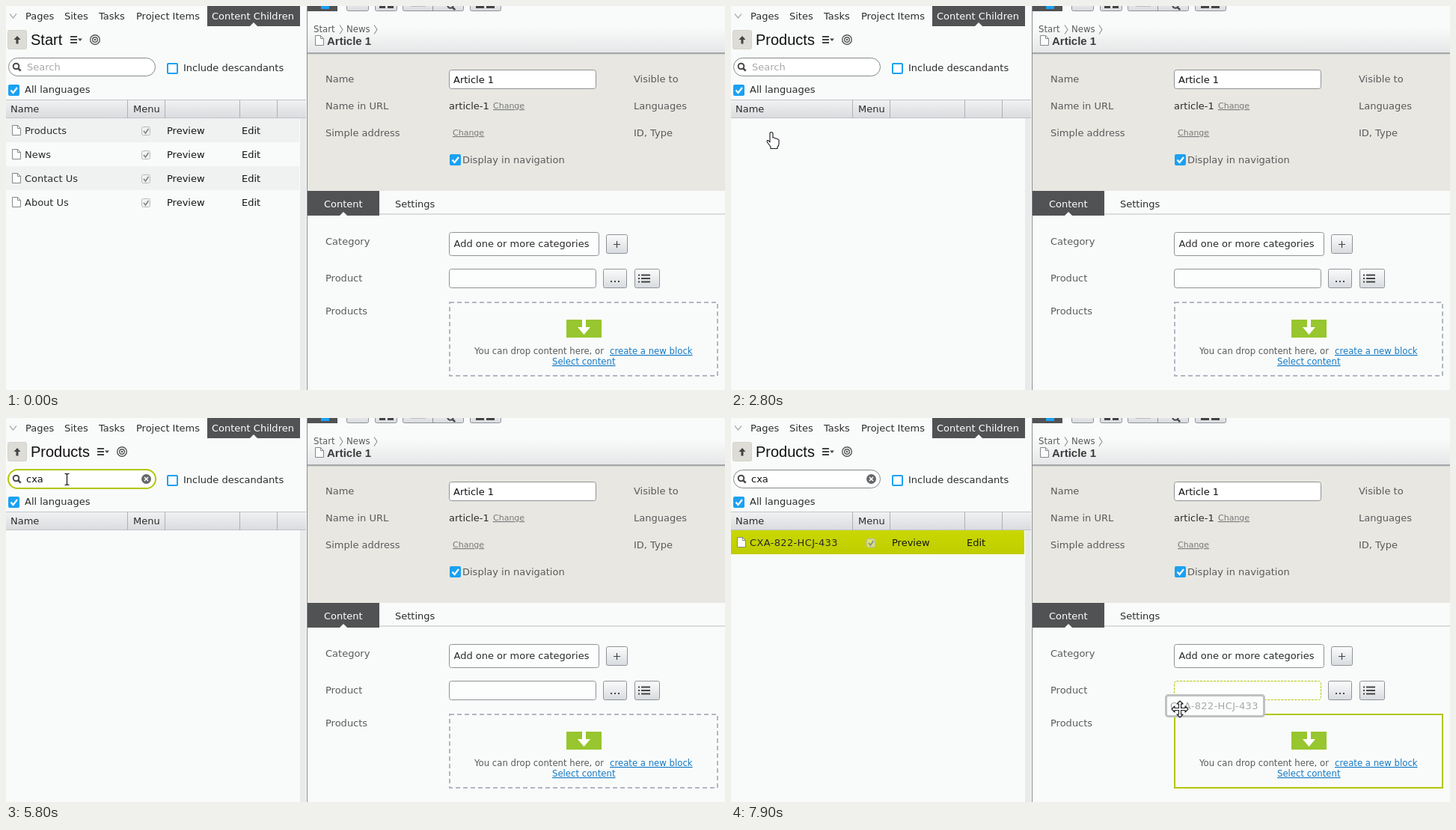
An HTML page that plays this animation: 961 px wide and 513 px high, repeating every 8000 ms.

```html
<!DOCTYPE html>
<html lang="en">
<head>
<meta charset="utf-8">
<title>Content Children</title>
<style>
html, body { margin: 0; width: 100%; height: 100%; overflow: hidden; background: #f9fbfa; }
svg { display: block; width: 100%; height: 100%; }
text { font-family: "DejaVu Sans", Verdana, sans-serif; white-space: pre; }
.arial { font-family: "Liberation Sans", Arial, sans-serif; }
.code { letter-spacing: .027em; }
.link { text-decoration: underline; }
</style>
</head>
<body>
<svg id="stage" viewBox="0 0 961 513">
  <defs>
    <linearGradient id="head" x2="0" y2="1"><stop stop-color="#f1f2f3"/><stop offset="1" stop-color="#d9dbde"/></linearGradient>
    <linearGradient id="btn" x2="0" y2="1"><stop stop-color="#fbfcfc"/><stop offset="1" stop-color="#d8dbdf"/></linearGradient>
    <linearGradient id="crumb" x2="0" y2="1"><stop offset=".2" stop-color="#f9fbfa"/><stop offset="1" stop-color="#e6e7e8"/></linearGradient>
    <linearGradient id="pick" x2="0" y2="1"><stop stop-color="#c9d800"/><stop offset="1" stop-color="#bfcd00"/></linearGradient>
  </defs>
</svg>
<script>
const svg = document.getElementById('stage');
const INK = '#2b2b2b', LABEL = '#5a5a5c', DARK = '#515254', BLUE = '#1ba1f2', LIME = '#b3c600', PAGE = '#f9fbfa', EDGE = '#8f9297';

function el(tag, attrs = {}, parent = svg) {
  const n = document.createElementNS('http://www.w3.org/2000/svg', tag);
  for (const k in attrs) n.setAttribute(k, attrs[k]);
  parent.appendChild(n);
  return n;
}
const group = (parent = svg) => el('g', {}, parent);
const show = (n, on) => { n.style.display = on ? '' : 'none'; };
const box = (x, y, w, h, fill, parent, more = {}) =>
  el('rect', { x, y, width: w, height: h, fill, ...more }, parent);
const frame = (x, y, w, h, fill, stroke, rx, parent, more = {}) =>
  box(x + .5, y + .5, w - 1, h - 1, fill, parent, { stroke, rx, ...more });
const line = (d, stroke, width, parent, more = {}) =>
  el('path', { d, fill: 'none', stroke, 'stroke-width': width, ...more }, parent);
const shape = (d, fill, parent, more = {}) => el('path', { d, fill, ...more }, parent);
function text(x, y, str, fill = INK, size = 13, parent = svg, more = {}) {
  const n = el('text', { x, y, fill, 'font-size': size, ...more }, parent);
  n.textContent = str;
  return n;
}

// Icons
function page(x, y, g) {
  shape(`M${x + .5} ${y + .5}h7l4 4v9h-11z`, '#fdfdfd', g, { stroke: '#85878a' });
  line(`M${x + 7.5} ${y + .5}v4h4`, '#85878a', 1, g);
}
function checkbox(x, y, on) {
  box(x + 1, y + 1, 13, 13, on ? BLUE : '#fff', svg, { stroke: BLUE, 'stroke-width': 2, rx: 1 });
  if (on) line(`M${x + 3.5} ${y + 7.5}l3 3.5 5.5-7`, '#fff', 2.2);
}
function menu(x, y, g) {
  line(`M${x} ${y + 1}h9m-9 4h9m-9 4h9`, '#444', 1.8, g);
  shape(`M${x + 10} ${y + 3.5}h6l-3 3.5z`, '#444', g);
}
function lens(x, y, g) {
  el('circle', { cx: x, cy: y, r: 3.8, fill: 'none', stroke: '#4a4a4a', 'stroke-width': 2 }, g);
  line(`M${x + 2.8} ${y + 2.8}l3.4 3.4`, '#4a4a4a', 2.6, g);
}
const button = (x, y, w, h) => frame(x, y, w, h, 'url(#btn)', EDGE, 2);

box(0, 0, 961, 513, PAGE);

// Left pane: tabs
line('M5 10.5l4.5 5.5 4.5-5.5', '#a9abac', 1.2);
[[26, 'Pages'], [78, 'Sites'], [124, 'Tasks'], [174, 'Project Items']]
  .forEach(([x, s]) => text(x, 18, s));
box(269, 0, 124, 27, DARK);
text(275, 18, 'Content Children', '#fff');
shape('M326 27l5-5 5 5z', PAGE);

// Left pane: title and filters
frame(2, 32, 26, 26, '#dddcd6', '#d3d2cc', 2);
shape('M15 40l4.5 5h-3v5.500h-3v-5.500h-3z', '#444');
function heading(str, shift) {
  const g = group();
  text(33, 52, str, '#111', 20, g, { class: 'arial' });
  menu(86 + shift, 40, g);
  for (const r of [6.3, 3.3]) el('circle', { cx: 119 + shift, cy: 45, r, fill: 'none', stroke: '#555', 'stroke-width': 1.4 }, g);
  el('circle', { cx: 119 + shift, cy: 45, r: 1.3, fill: '#555' }, g);
  return g;
}
const titleA = heading('Start', 0), titleB = heading('Products', 36);

const plain = frame(3, 69, 197, 25, '#fff', '#85888b', 12);
const focus = box(3, 69, 197, 25, '#fff', svg, { stroke: LIME, 'stroke-width': 2, rx: 12.5 });
lens(13.5, 80.5);
const hint = text(28, 86, 'Search', '#a9a9a9');
const typed = text(27, 86, '', '#111');
const caret = box(0, 73, 1, 16, '#111');
const clear = group();
el('circle', { cx: 187.500, cy: 81.5, r: 6.5, fill: '#66686b' }, clear);
line('M185 79l5 5m0-5l-5 5', '#fff', 1.6, clear);
checkbox(215, 76, false);
text(237, 87, 'Include descandants');
checkbox(3, 105, true);
text(25, 116, 'All languages');

// Left pane: table
box(393, 150, 8, 363, '#e9ebeb');
const thumb = shape('M393 513v-358q0-5 4-5t4 5v358z', '#929394');
box(0, 125, 401, 25, 'url(#head)');
line('M0 125.5h401M0 149.5h401', '#c2c4c7', 1);
line('M162.5 126v24m50-24v24m100-24v24m50-24v24', '#aeb0b3', 1);
text(6, 142, 'Name');
text(170, 142, 'Menu');

const picks = [];
function list(names, cls) {
  const g = group();
  names.forEach((s, i) => {
    const y = 150 + 32 * i;
    if (i % 2 === 0) box(0, y, 392, 32, '#f0f2f1', g);
    if (i === 0) picks.push(box(0, y, 392, 32, 'url(#pick)', g));
    page(8, y + 9, g);
    text(25, y + 21, s, INK, 13, g, { class: cls });
    frame(181, y + 11, 12, 12, '#eef0ef', '#b9bbbb', 2, g, { 'fill-opacity': .5 });
    line(`M184 ${y + 17}l2.500 3 4-6`, '#8b8d8d', 1.9, g);
    text(215, y + 21, 'Preview', '#151515', 13, g);
    text(315, y + 21, 'Edit', '#151515', 13, g);
  });
  return g;
}
const hit = 'CXA-822-HCJ-433';
const listA = list(['Products', 'News', 'Contact Us', 'About Us'], '');
const listB = list(['KTB-008-OOI-348', 'QSC-542-AYJ-456', 'ELD-632-MHJ-231', 'PAO-312-EGJ-099', 'LOA-922-CFJ-769', hit,
  'PAS-722-GDJ-787', 'LER-622-YYJ-994', 'OIA-522-RGJ-948', 'LAP-422-SFJ-030', 'REF-322-VAJ-432', 'TEO-222-BAJ-115'], 'code');
const listC = list([hit], 'code');
const rowMenu = group();
menu(374, 162, rowMenu);

// Right pane: toolbar and breadcrumb
line('M402.5 0v513', '#8a8c8f', 1);
box(403, 20, 558, 42, 'url(#crumb)');
box(403, 0, 40, 7, DARK);
box(421, 0, 11, 4, BLUE);
[[455, 30], [493, 30], [530, 82], [620, 42]].forEach(([x, w]) => button(x, -14, w, 21));
line('M570.5 0v7', EDGE, 1);
for (const [x, w] of [[499, 8], [510, 8], [628, 11], [642, 11]]) box(x, 0, w, 3, '#444');
line('M541 .5h20', '#b9bbbe', 1);
lens(594, -1);
text(411, 35, 'Start', LABEL, 11.7);
text(455, 35, 'News', LABEL, 11.7);
line('M446 25.5l4 6-4 6m46-12l4 6-4 6', '#8d8f91', 1.1);
page(413, 39);
text(429, 52, 'Article 1', '#3c3c3e', 15, svg, { class: 'arial', 'font-weight': 700 });

// Right pane: properties
box(403, 63, 558, 184, '#e8e7e1');
box(403, 62, 558, 2, '#a5a8aa');
box(403, 64, 558, 1, '#d6d6d2');
[[427, 102, 'Name'], [427, 138, 'Name in URL'], [427, 174, 'Simple address'], [839, 102, 'Visible to'], [839, 138, 'Languages'],
  [839, 174, 'ID, Type'], [610, 210, 'Display in navigation'], [427, 319, 'Category'], [427, 368, 'Product'], [427, 412, 'Products']]
  .forEach(([x, y, s]) => text(x, y, s, LABEL));
frame(592, 85, 197, 26, '#fff', EDGE, 3);
text(598, 103, 'Article 1', '#111');
text(592, 138, 'article-1');
text(651, 137, 'Change', '#77787a', 11, svg, { class: 'link' });
text(597, 173, 'Change', '#77787a', 11, svg, { class: 'link' });
checkbox(593, 198, true);

// Right pane: content form
box(403, 277, 558, 2, '#dcdedd');
box(403, 247, 96, 33, DARK);
text(425, 269, 'Content', '#fff');
shape('M446 280l5-5 5 5z', PAGE);
text(520, 269, 'Settings');
frame(592, 302, 201, 32, '#fcfdfd', EDGE, 3);
text(598.5, 322, 'Add one or more categories');
button(802, 305, 29, 26);
line('M812 318.5h9m-4.500-4.500v9', '#444', 1.2);
const field = frame(592, 351, 197, 26, '#fcfdfd', EDGE, 3);
button(798, 351, 32, 26);
for (const x of [808, 813, 818]) box(x, 367, 2, 2, '#444');
button(840, 351, 34, 26);
line('M849 359.5h12m-12 4.500h12m-12 4.500h12', '#444', 1.8);
line('M845 359.5h2m-2 4.500h2m-2 4.500h2', '#444', 1.8);
const zone = box(593, 396, 358, 98, 'none', svg, { 'stroke-width': 2 });
box(749, 419, 47, 24, '#97c62e');
shape('M770 419h5v10h6l-8.500 10-8.500-10h6z', '#fff');
text(626, 465, 'You can drop content here, or', LABEL, 11.7);
text(807, 465, 'create a new block', '#157ac6', 11.7, svg, { class: 'link' });
text(730, 479, 'Select content', '#157ac6', 11.7, svg, { class: 'link' });

// Tooltips and drag label
function tip(x, y, w, str, cls) {
  const g = group();
  box(x + 3, y + 3, w, 19, '#8f9192', g, { opacity: .8 });
  frame(x, y, w + 1, 20, '#fcfdfd', '#e6e8e8', 0, g);
  const t = text(x + 5, y + 13, str, '#e3e4e4', 11, g, { class: cls });
  return { g, t };
}
const tipA = tip(54, 194, 59, 'Products', ''), tipB = tip(78, 190, 106, hit, 'code');
const label = group();
box(-18.5, -17.5, 131, 28, '#fbfcfc', label, { stroke: '#c0c2c2', 'stroke-width': 3, rx: 3 });
text(-13, 1, hit, '#a6a8a8', 13, label, { class: 'code' });

// Pointers, hot spot at 0,0
const pointer = {};
for (const [name, d] of [
  ['arrow', 'M.5 .5V15.500L4 12.200 6.500 18 9 17 6.500 11.300H11z'],
  ['hand', 'M-2 2.500a2 2 0 0 1 4 0V8q2.200-.8 3 1 2.200-.7 3 1 2.200-.3 2 2v4.500q0 2-2 4V22.500H-1V20L-5.500 14q-1.200-3 1.300-2.400L-2 14z'],
  ['move', 'M0-11l4 4H1.500v5.500H7V-4l4 4-4 4V1.500H1.500V7H4L0 11l-4-4h2.500V1.500H-7V4l-4-4 4-4v2.500h5.500V-7H-4z']
]) pointer[name] = shape(d, '#fff', svg, { stroke: '#1a1a22', 'stroke-width': 1.1, 'stroke-linejoin': 'round' });
pointer.beam = line('M-3-7.500h2l1 1 1-1h2m-3 1V6.500m-3 1h2l1-1 1 1h2', '#111', 1.2);

// time in 100 ms, x, y, pointer
const path = [
  [1, 959, 29, 'arrow'], [3, 720, 64, 'arrow'], [4, 360, 122, 'arrow'], [5, 167, 104, 'arrow'],
  [7, 118, 88, 'beam'], [8, 97.500, 84, 'beam'],
  [10, 94, 106, 'arrow'], [11, 82, 142, 'arrow'], [12, 66, 182, 'hand'], [13, 52, 201, 'hand'],
  [15, 47, 216, 'hand'], [16, 43, 228, 'hand'], [17, 42, 222, 'hand'], [18, 46, 201, 'hand'], [19, 51, 178, 'hand'], [20, 54, 168, 'hand'],
  [34, 69, 118, 'arrow'], [35, 72, 101, 'arrow'], [36, 76, 86, 'beam'], [37, 80, 76, 'beam'], [38, 82, 73, 'beam'], [39, 82, 78, 'beam'], [40, 81.500, 82, 'beam'],
  [63, 84, 108, 'arrow'], [64, 80, 146, 'arrow'], [65, 74, 176, 'hand'], [66, 73, 180, 'hand'], [68, 76, 171, 'hand'], [69, 78, 163, 'hand'],
  [73, 92, 172, 'hand'], [74, 150, 194, 'move'], [75, 232, 222, 'move'], [76, 410, 286, 'move'],
  [77, 500, 314, 'move'], [78, 552, 346, 'move'], [79, 600, 389, 'move']
];
const at = (steps, t, first) => steps.reduce((v, s) => s[0] <= t ? s : v, first);
const within = (t, a, b) => t >= a && t < b;

function draw(ms) {
  const t = Math.floor(ms / 100);
  const [, x, y, kind] = at(path, t, [0, 0, 0, 'none']);
  for (const k in pointer) {
    show(pointer[k], k === kind);
    pointer[k].setAttribute('transform', `translate(${x} ${y})`);
  }

  show(titleA, t < 28);
  show(titleB, t >= 28);
  show(listA, t < 28);
  show(listB, within(t, 30, 58));
  show(listC, t >= 63);
  show(thumb, within(t, 31, 58));
  const dragging = t >= 74, picked = t === 27 || t >= 73;
  picks.forEach(p => show(p, picked));

  const rows = t < 28 ? 4 : t < 30 ? 0 : t < 58 ? 11 : t < 63 ? 0 : 1;
  const row = Math.floor((y - 150) / 32);
  show(rowMenu, !picked && kind === 'hand' && row >= 0 && row < rows);
  rowMenu.setAttribute('transform', `translate(0 ${32 * row})`);

  const focused = within(t, 41, 73);
  show(focus, focused);
  show(plain, !focused);
  show(hint, t < 50);
  const n = t < 50 ? 0 : t < 51 ? 1 : t < 55 ? 2 : 3;
  typed.textContent = 'cxa'.slice(0, n);
  caret.setAttribute('x', [27, 34, 41, 49][n]);
  show(caret, within(t, 41, 46) || within(t, 50, 58) || within(t, 63, 68));
  show(clear, t >= 58);

  show(tipA.g, within(t, 22, 27));
  tipA.g.setAttribute('opacity', t === 22 ? .4 : 1);
  show(tipB.g, within(t, 70, 73));
  tipB.t.setAttribute('fill', '#f3f4f4');

  show(label, dragging);
  label.setAttribute('transform', `translate(${x} ${y - 1})`);
  field.setAttribute('stroke', dragging ? LIME : EDGE);
  field.setAttribute('stroke-dasharray', dragging ? '3 1.5' : 'none');
  zone.setAttribute('stroke', dragging ? LIME : '#b3b6c2');
  zone.setAttribute('stroke-dasharray', dragging ? 'none' : '6 4');
}

const start = performance.now();
function tick() {
  draw((performance.now() - start) % 8000);
  requestAnimationFrame(tick);
}
tick();
</script>
</body>
</html>
```
